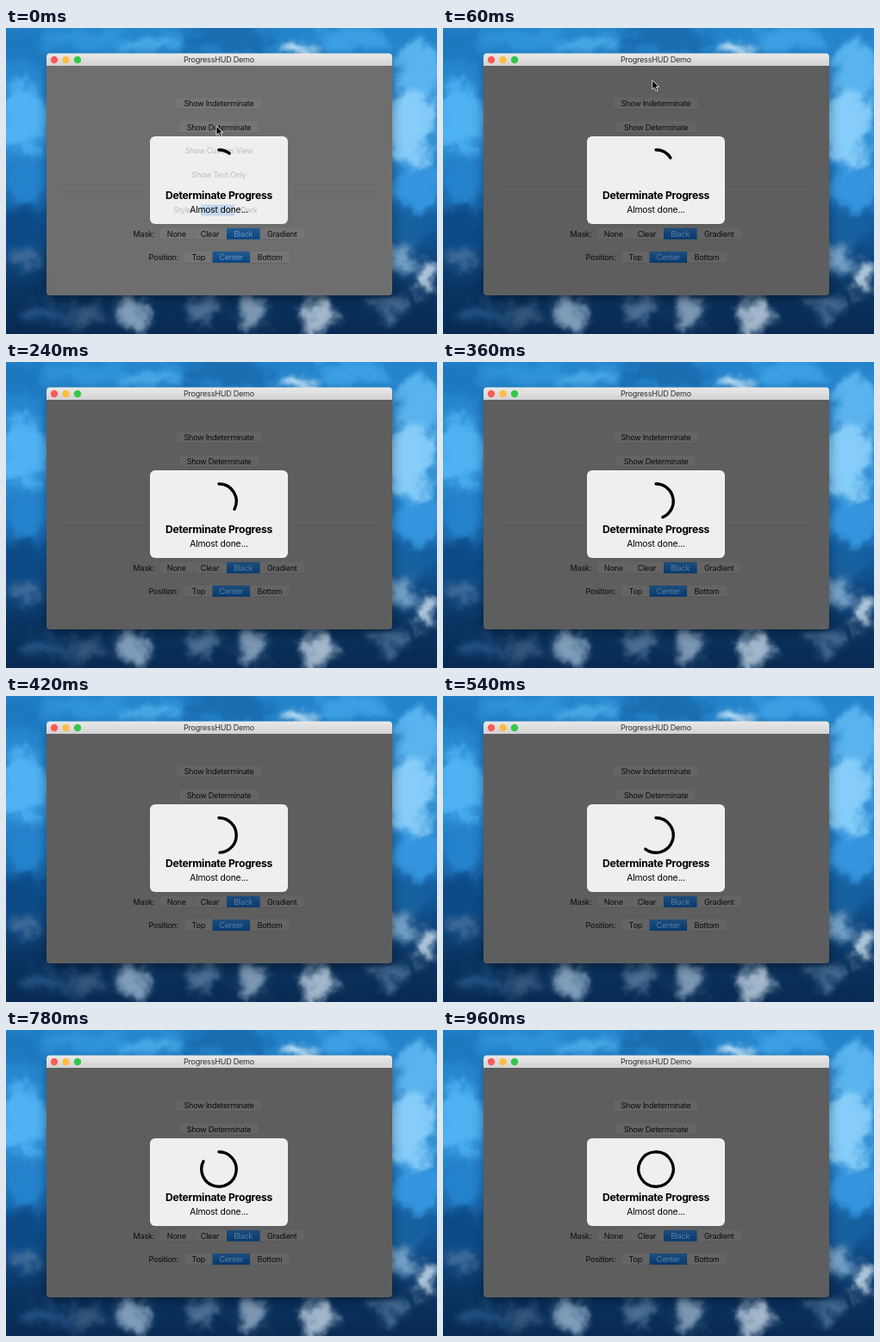
An HTML page that plays this animation: 500x356 px, repeating every 1020 ms.

```html
<!DOCTYPE html>
<html lang="en">
<head>
<meta charset="utf-8">
<title>ProgressHUD Demo</title>
<style>
html, body { margin: 0; width: 100%; height: 100%; overflow: hidden; background: #12538f; }
svg { display: block; width: 500px; height: 356px; }
text { font: 9.1px Inter, Roboto, sans-serif; letter-spacing: -.27px; fill: #0c0c0c; }
.mid { text-anchor: middle; }
.end { text-anchor: end; }
.title { fill: #333; }
.heading { font-size: 12.2px; font-weight: 700; fill: #000; }
.detail { font-size: 10.3px; letter-spacing: -.17px; fill: #000; }
</style>
</head>
<body>
<svg viewBox="0 0 500 356" xmlns="http://www.w3.org/2000/svg">
  <defs>
    <linearGradient id="sky" x2="0" y2="1">
      <stop offset="0" stop-color="#2484cb"/>
      <stop offset=".4" stop-color="#2a8ad2"/>
      <stop offset=".65" stop-color="#12599c"/>
      <stop offset=".85" stop-color="#0a3462"/>
      <stop offset="1" stop-color="#082a52"/>
    </linearGradient>
    <linearGradient id="bar" x2="0" y2="1">
      <stop offset="0" stop-color="#e9e9e9"/>
      <stop offset="1" stop-color="#d2d2d2"/>
    </linearGradient>
    <linearGradient id="blue" x2="0" y2="1">
      <stop offset="0" stop-color="#1f4d7c"/>
      <stop offset="1" stop-color="#063a70"/>
    </linearGradient>
    <filter id="cloud" x="-10%" y="-10%" width="120%" height="120%" color-interpolation-filters="sRGB">
      <feTurbulence type="fractalNoise" baseFrequency=".035" numOctaves="4" seed="8" result="n"/>
      <feGaussianBlur in="SourceGraphic" stdDeviation="6" result="b"/>
      <feDisplacementMap in="b" in2="n" scale="36" xChannelSelector="R" yChannelSelector="G"/>
    </filter>
    <filter id="shade" x="-10%" y="-10%" width="120%" height="125%">
      <feGaussianBlur stdDeviation="7"/>
    </filter>
  </defs>
  <rect width="500" height="356" fill="url(#sky)"/>
  <g id="clouds" filter="url(#cloud)"></g>
  <rect x="47" y="36" width="401" height="279" rx="5" opacity=".4" filter="url(#shade)"/>
  <g id="body">
    <rect x="47" y="30" width="401" height="281" rx="4" fill="#5e5e5e"/>
    <path d="M64 190.5H431" stroke="#000" opacity=".05"/>
    <g id="controls"></g>
  </g>
  <path d="M47 44V33.5a4 4 0 0 1 4-4H444a4 4 0 0 1 4 4V44Z" fill="url(#bar)"/>
  <circle cx="56" cy="37" r="4.2" fill="#fc5b57"/>
  <circle cx="69.5" cy="37" r="4.2" fill="#fdbc40"/>
  <circle cx="83" cy="37" r="4.2" fill="#34c84a"/>
  <text class="mid title" x="247" y="40.2">ProgressHUD Demo</text>
  <g id="hud">
    <rect x="167" y="126" width="160" height="102" rx="6" fill="#efefef"/>
    <g id="ghost" opacity=".22"></g>
    <path id="ring" fill="none" stroke="#000" stroke-width="3.4" stroke-linecap="round"/>
    <text class="mid heading" x="247" y="199">Determinate Progress</text>
    <text class="mid detail" x="247" y="214.6">Almost done...</text>
  </g>
  <path id="cursor" d="M0 0V10.6L2.5 8.4L4.4 12.5L6.2 11.7L4.5 7.7H7.7Z" fill="#000" stroke="#fff" stroke-width=".8"/>
</svg>
<script>
const STEP = 60, STEPS = 17;
const $ = id => document.getElementById(id);

// x, y, radius x, radius y, colour
const blobs = [
  [12, 20, 34, 20, '#1d78be'], [100, 12, 50, 14, '#2f93d8'], [165, 18, 34, 10, '#4aa9e6'],
  [255, 10, 55, 18, '#1a6db0'], [338, 24, 18, 9, '#c2e2f7'], [400, 12, 42, 16, '#3c9fe2'],
  [20, 105, 26, 44, '#4fb2f3'], [28, 180, 26, 26, '#2482cb'], [14, 232, 30, 20, '#0c4a86'],
  [478, 45, 28, 30, '#5ab3ee'], [468, 115, 28, 46, '#86cdf9'], [478, 185, 28, 28, '#3596df'],
  [466, 232, 26, 18, '#17619f'], [460, 268, 13, 16, '#7ba6cb'], [488, 290, 12, 18, '#b3cadd'],
  [22, 268, 20, 13, '#3d6a97'], [45, 330, 30, 12, '#204f80'], [94, 336, 20, 14, '#34577c'],
  [148, 332, 19, 24, '#7f9cb9'], [232, 328, 18, 14, '#4c7093'], [285, 332, 16, 20, '#7c98b3'],
  [362, 334, 16, 24, '#a3b8cc'], [445, 324, 26, 11, '#436a92']
];
$('clouds').innerHTML = blobs.map(([x, y, rx, ry, c]) =>
  `<ellipse cx="${x}" cy="${y}" rx="${rx}" ry="${ry}" fill="${c}"/>`).join('');

const label = (x, y, s, cls = 'mid', fill = '#0c0c0c') =>
  `<text class="${cls}" x="${x}" y="${y}" style="fill:${fill}">${s}</text>`;

const plate = (x, y, w) =>
  `<rect x="${x}" y="${y - 6}" width="${w}" height="13" rx="2.5" fill-opacity=".12"/>` +
  `<rect x="${x}" y="${y - 6.5}" width="${w}" height="13" rx="2.5" fill="#646464"/>`;

const button = (y, w, s) => plate(247 - w / 2, y, w) + label(247, y + 3.3, s);

function segments(y, edges, names, ink, on) {
  let out = plate(edges[0], y, edges[names.length] - edges[0]);
  names.forEach((s, i) => {
    const x = edges[i], w = edges[i + 1] - x;
    if (i === on) out += `<rect x="${x}" y="${y - 6.5}" width="${w}" height="13" fill="url(#blue)"/>`;
    else if (i) out += `<path d="M${x} ${y - 6}v12" stroke="#000" stroke-opacity=".1" stroke-width=".7"/>`;
    out += label(x + w / 2, y + 3.3, s, 'mid', i === on ? ink : '#0c0c0c');
  });
  return out;
}

$('controls').innerHTML =
  button(88, 98, 'Show Indeterminate') +
  button(115.3, 92, 'Show Determinate') +
  label(172, 242.6, 'Mask:', 'end') +
  segments(239.3, [178.5, 217, 256, 294.5, 346], ['None', 'Clear', 'Black', 'Gradient'], '#5d7f9f', 2) +
  label(200, 269.8, 'Position:', 'end') +
  segments(266.5, [207, 239.5, 283, 329], ['Top', 'Center', 'Bottom'], '#5d7f9f', 1);

$('ghost').innerHTML =
  label(247, 146.3, 'Show Custom View') +
  label(247, 173.6, 'Show Text Only') +
  label(217, 215.4, 'Style:', 'end') +
  '<rect x="226" y="205.5" width="39" height="13" fill="#2a86e8"/>' +
  label(282, 215.4, 'Dark');

function arc(deg) {
  const r = 20.2, a = deg * Math.PI / 180;
  const x = 247 + r * Math.sin(a), y = 162 - r * Math.cos(a);
  return `M247 ${162 - r}A${r} ${r} 0 ${deg > 180 ? 1 : 0} 1 ${x} ${y}`;
}

function draw(ms) {
  const k = Math.floor(ms / STEP) % STEPS;
  const fading = k === 0;
  $('body').style.filter = fading ? 'brightness(1.17)' : 'none';
  $('ghost').style.display = fading ? '' : 'none';
  $('ring').setAttribute('d', arc(Math.min(37 + 20 * k, 359)));
  $('cursor').style.display = k < 3 ? '' : 'none';
  $('cursor').setAttribute('transform', `translate(${244 - 1.2 * k} ${114 - 53.2 * k})`);
}

let start;
function tick(now) {
  start ??= now;
  draw(now - start);
  requestAnimationFrame(tick);
}
draw(0);
requestAnimationFrame(tick);
</script>
</body>
</html>
```
